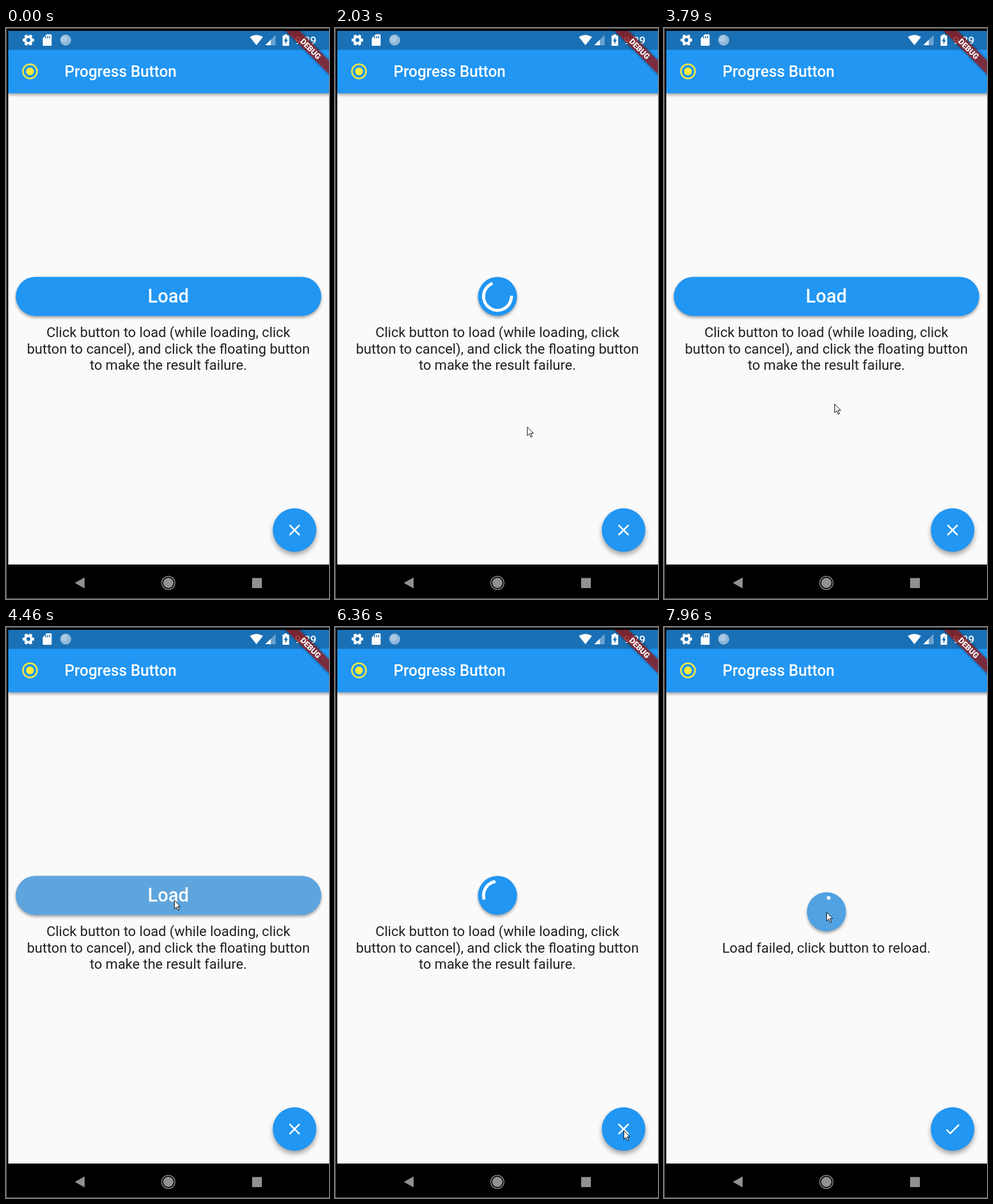
Recreate the animation shown at these times as an HTML page. Size 563 by 994 pixels, loop 7990 ms.

```html
<!DOCTYPE html>
<html lang="en">
<head>
<meta charset="utf-8">
<title>Progress Button</title>
<style>
  html, body { margin: 0; width: 100%; height: 100%; overflow: hidden; background: #000; }
  svg { display: block; width: 100%; height: 100%; font-family: Roboto, sans-serif; }
  .raised { filter: drop-shadow(0 3px 2.5px rgba(0, 0, 0, .36)); }
  .fab { filter: drop-shadow(0 5px 4px rgba(0, 0, 0, .36)); }
  .center { text-anchor: middle; }
  .line { fill: none; stroke: #fff; stroke-width: 2.7; }
</style>
</head>
<body>
<svg viewBox="0 0 563 994">
  <rect width="563" height="994" fill="#000"/>
  <rect x="4" y="113" width="559" height="821" fill="#fafafa"/>

  <!-- App bar -->
  <rect class="raised" x="4" y="38" width="565" height="75.5" fill="#2196f3"/>
  <rect x="4" y="5" width="559" height="33" fill="#1a70b5"/>
  <g fill="none" stroke="#ffeb3b" stroke-width="2.7">
    <circle cx="41.8" cy="75.5" r="12.3"/>
    <circle cx="41.8" cy="75.5" r="6.7" fill="#ffeb3b" stroke="none"/>
  </g>
  <text x="102" y="85" font-size="27" font-weight="500" fill="#fff">Progress Button</text>

  <!-- Status icons -->
  <g fill="#fff">
    <g fill="none" stroke="#fff">
      <circle cx="39" cy="21" r="5.6" stroke-width="4.4"/>
      <circle cx="39" cy="21" r="8.4" stroke-width="3.4" pathLength="12" stroke-dasharray="1.1 .9" stroke-dashoffset=".55"/>
    </g>
    <path d="M71 11h7a1.5 1.5 0 0 1 1.500 1.500v17a1.500 1.500 0 0 1-1.500 1.500h-12.500a1.500 1.500 0 0 1-1.500-1.500V18z"/>
    <path d="M69 14v4m3.500-4v4m3.500-4v4" stroke="#1a70b5" stroke-width="1.600"/>
    <circle cx="104" cy="21" r="9" fill="#8db7da" stroke="#a9c9e4"/>
    <circle cx="102" cy="19" r="6" fill="#a9c9e4"/>
    <path d="M425 15.500q11.500-7 23 0L436.500 30z"/>
    <path d="M452 30l18-18v18z" opacity=".35"/>
    <path d="M452 30l9.500-9.500V30z"/>
    <path d="M482 13h3.500v-2h4.500v2h3.500v18H482z"/>
    <path d="M488.800 15.500l-4.300 7.500h2.500v5.500l4.300-8h-2.500z" fill="#1a70b5"/>
    <text x="503.500" y="28" font-size="19" font-weight="500">9:29</text>
  </g>

  <!-- Corner banner -->
  <g transform="translate(531 36.500) rotate(45)">
    <rect x="-90" y="-8.500" width="180" height="17" fill="#000" opacity=".5" style="filter:blur(2px)"/>
    <rect x="-90" y="-8.500" width="180" height="17" fill="#b71c1c" fill-opacity=".63"/>
    <text class="center" y="4.800" font-size="13.750" font-weight="900" fill="#fff">DEBUG</text>
  </g>
  <path d="M0 0H563V5H0z"/>
  <path d="M.5 994V.5H563M0 993.500H563" fill="none" stroke="#777"/>

  <!-- Navigation bar -->
  <g fill="#919191">
    <path d="M120 966l17-9.500v19z"/>
    <circle cx="283" cy="966" r="9"/>
    <circle cx="283" cy="966" r="11.500" fill="none" stroke="#919191" stroke-width="1.500"/>
    <rect x="429" y="957.500" width="17" height="17.500"/>
  </g>

  <!-- Floating button -->
  <circle class="fab" cx="503" cy="874" r="38" fill="#2196f3"/>
  <circle id="fabInk" cx="503" cy="874" r="38" fill="#bcbcbc"/>
  <g class="line" transform="translate(503 874)">
    <path id="fabCross" d="M-8.800-8.800L8.800 8.800M8.800-8.800L-8.800 8.800"/>
    <path id="fabCheck" d="M-10.600 1L-4 7.500L11.200-7.700"/>
  </g>

  <!-- Load button, centred on its own origin -->
  <g id="button">
    <rect id="body" class="raised" y="-34" height="68" rx="34" fill="#2196f3"/>
    <rect id="ink" y="-34" height="68" rx="34" fill="#bcbcbc"/>
    <text id="label" class="center" x="-.3" y="11.200" font-size="32.350" font-weight="500" fill="#fff">Load</text>
    <path id="spinner" fill="none" stroke="#fff" stroke-width="5.400" stroke-linecap="square"/>
    <path id="failIcon" class="line" d="M-9.500-9.500L9.500 9.500M9.500-9.500L-9.500 9.500"/>
  </g>

  <g class="center" font-size="24.270" fill="#212121">
    <g id="hint">
      <text x="283" y="538">Click button to load (while loading, click</text>
      <text x="283" y="566.500">button to cancel), and click the floating button</text>
      <text x="283" y="595">to make the result failure.</text>
    </g>
    <text id="failed" x="283" y="566.500">Load failed, click button to reload.</text>
  </g>

  <path id="cursor" d="M.5.700V15.800l3.500-3.300 2.600 5.900 2.300-1-2.600-5.800h4.700z" fill="#fff" stroke="#000"/>
</svg>

<script>
const LOOP = 7990, MORPH = 600, FULL = 532.5, ROUND = 68;
const FAIL_AT = 6670, RETRY_AT = 7900, CHECK_AT = 6470;
const SHRINKS = [982, 4484], EXPAND = 3090;
const SPINS = [[1725, EXPAND], [5220, FAIL_AT], [7935, LOOP]];
const PRESSES = [[970, 1000], [2996, 3100], [4340, 4484], [RETRY_AT, LOOP]];
// time, x, y of the pointer tip
const POINTER = [
  [270, 51, 525], [720, 271, 469], [1450, 271, 469], [1740, 312, 680],
  [2050, 335, 694], [2350, 328, 660], [2750, 288, 475], [3120, 288, 475],
  [3370, 296, 649], [3550, 298, 664], [3790, 297, 654], [4190, 293, 475],
  [4560, 293, 475], [4820, 309, 666], [5060, 325, 706], [5300, 335, 706],
  [5880, 496, 868], [6000, 503, 876], [6420, 503, 876], [6700, 372, 709],
  [7130, 270, 540], [7430, 283, 496], [LOOP, 283, 496]
];

const el = id => document.getElementById(id);
const clamp = v => Math.min(1, Math.max(0, v));
const show = (id, opacity) => el(id).setAttribute("opacity", +opacity);
const move = (id, x, y) => el(id).setAttribute("transform", `translate(${x} ${y})`);

// Cubic bezier (0.4, 0, 0.2, 1)
function fastOutSlowIn(x) {
  if (x <= 0 || x >= 1) return clamp(x);
  let lo = 0, hi = 1, s;
  for (let i = 0; i < 18; i++) {
    s = (lo + hi) / 2;
    const at = 1.2 * (1 - s) ** 2 * s + .6 * (1 - s) * s * s + s ** 3;
    if (at < x) lo = s; else hi = s;
  }
  return 3 * (1 - s) * s * s + s ** 3;
}

function pointerAt(t) {
  const i = Math.max(1, POINTER.findIndex(p => p[0] > t));
  const [t0, x0, y0] = POINTER[i - 1], [t1, x1, y1] = POINTER[i];
  const u = clamp((t - t0) / (t1 - t0)), k = u * u * (3 - 2 * u);
  return [x0 + (x1 - x0) * k, y0 + (y1 - y0) * k];
}

function buttonWidth(t) {
  const progress = start => fastOutSlowIn((t - start) / MORPH);
  const closed = progress(SHRINKS[0]) - progress(EXPAND) + progress(SHRINKS[1]);
  return FULL - (FULL - ROUND) * closed;
}

function labelOpacity(t) {
  const fade = start => clamp((t - start) / 100);
  return 1 - fade(SHRINKS[0]) + fade(EXPAND + MORPH - 100) - fade(SHRINKS[1]);
}

const pressInk = (t, [down, up]) => .4 * clamp((t - down) / 80) * (1 - clamp((t - up) / 200));

function spinnerPath(elapsed) {
  const step = Math.floor(elapsed / 1000), phase = elapsed / 1000 - step;
  const head = fastOutSlowIn(phase * 2), tail = fastOutSlowIn(phase * 2 - 1);
  const start = Math.PI * (-.5 + 1.5 * tail + 1.7 * phase - .8 * step);
  const sweep = Math.max(1.5 * Math.PI * (head - tail), .004);
  const point = a => `${24.3 * Math.cos(a)} ${24.3 * Math.sin(a)}`;
  return `M${point(start)}A24.3 24.3 0 ${+(sweep > Math.PI)} 1 ${point(start + sweep)}`;
}

function draw(t) {
  const failed = t >= FAIL_AT, width = buttonWidth(t);
  move("button", 283.25, failed ? 495.7 : 467.2);
  for (const id of ["body", "ink"]) {
    el(id).setAttribute("x", -width / 2);
    el(id).setAttribute("width", width);
  }
  show("ink", Math.max(...PRESSES.map(p => pressInk(t, p))));
  show("label", labelOpacity(t));

  const spin = SPINS.find(([from, to]) => t >= from && t < to);
  show("spinner", !!spin);
  if (spin) el("spinner").setAttribute("d", spinnerPath(t - spin[0]));

  show("failIcon", failed && t < RETRY_AT);
  show("hint", !failed);
  show("failed", failed);
  show("fabCross", t < CHECK_AT);
  show("fabCheck", t >= CHECK_AT);
  show("fabInk", pressInk(t, [6375, 6470]));

  show("cursor", t >= POINTER[0][0]);
  move("cursor", ...pointerAt(t));
}

const begin = performance.now();
function tick() {
  draw((performance.now() - begin) % LOOP);
  requestAnimationFrame(tick);
}
tick();
</script>
</body>
</html>
```
